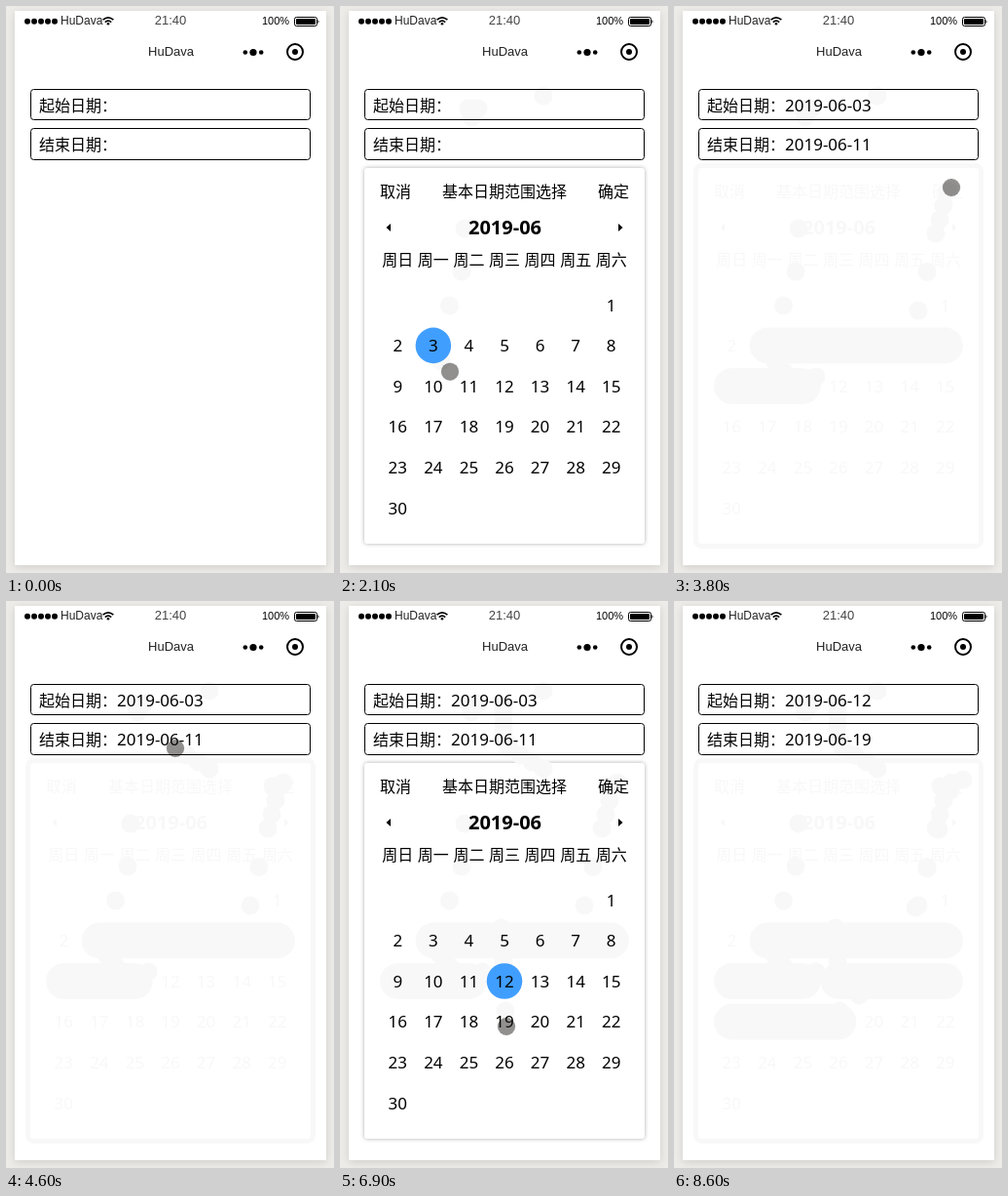
Write an HTML page that moves like this. It is 337 by 581 pixels and loops after 9.3 s.

```html
<!DOCTYPE html>
<html lang="zh-CN">
<head>
<meta charset="utf-8">
<title>日期范围选择</title>
<style>
html, body { margin: 0; width: 100%; height: 100%; overflow: hidden; background: #edece8; }
svg { display: block; width: 337px; height: 581px; }
text { font: 16px "Noto Sans CJK SC", "Noto Sans CJK", sans-serif; white-space: pre; }
.num { font: 17px "Noto Sans", sans-serif; }
.month { font: bold 20px "Noto Sans", sans-serif; }
.ui { font: 12px "Liberation Sans", sans-serif; }
.mid { text-anchor: middle; }
.phone { fill: #fff; filter: drop-shadow(0 2px 4px rgba(0, 0, 0, .13)); }
.field { fill: none; stroke: #000; }
.box { fill: #fff; filter: drop-shadow(0 0 2px rgba(0, 0, 0, .32)); }
.rim { fill: none; stroke: #f8f8f8; stroke-width: 5; }
.soft, .faint text, .faint path { fill: #f8f8f8; }
.band { fill: #a0cfff; }
.pick { fill: #409eff; }
#dot { fill: rgba(25, 22, 20, .48); stroke: rgba(0, 0, 0, .07); }
</style>
</head>
<body>
<svg viewBox="0 0 337 581">
  <rect class="phone" x="9" y="5" width="320" height="568"/>
  <g id="signal"></g>
  <text class="ui" x="56" y="19" fill="#222">HuDava</text>
  <g fill="none" stroke="#000" stroke-width="1.7">
    <path d="M99.6 14.2Q105 9.6 110.4 14.2M101.8 16.6Q105 13.8 108.2 16.6"/>
    <circle cx="105" cy="18.3" r="1.3" fill="#000" stroke="none"/>
  </g>
  <text class="ui mid" x="169" y="19" fill="#444" style="font-size:13px">21:40</text>
  <text class="ui" x="263" y="19" style="font-size:11px">100%</text>
  <rect x="296.5" y="11.5" width="23" height="9" rx="2" fill="none" stroke="#000"/>
  <rect x="298" y="13" width="20" height="6" rx="1"/>
  <path d="M320.5 14q2 2 0 4z"/>
  <text class="ui mid" x="169.5" y="51" fill="#222" style="font-size:13px">HuDava</text>
  <circle cx="245.8" cy="47.5" r="2.3"/><circle cx="254" cy="47.5" r="3.6"/><circle cx="262.2" cy="47.5" r="2.3"/>
  <circle cx="297" cy="47" r="8" fill="none" stroke="#000" stroke-width="2"/><circle cx="297" cy="47" r="3"/>

  <rect id="rim" class="rim" x="22.5" y="163.5" width="293" height="390" rx="6"/>
  <rect id="box" class="box" x="25" y="166" width="288" height="385" rx="3"/>
  <g id="trail"></g>
  <g id="bands"></g>
  <g id="sheet">
    <text x="41" y="196">取消</text>
    <text x="105" y="196">基本日期范围选择</text>
    <text x="265" y="196">确定</text>
    <path d="M52 223v8l-4.5-4zM286 223v8l4.5-4z"/>
    <text class="month mid" x="169.5" y="234">2019-06</text>
  </g>

  <rect class="field" x="25.5" y="85.5" width="287" height="31" rx="3"/>
  <rect class="field" x="25.5" y="125.5" width="287" height="32" rx="3"/>
  <text x="34" y="108">起始日期：</text><text id="from" class="num" x="114" y="108"></text>
  <text x="34" y="148">结束日期：</text><text id="to" class="num" x="114" y="148"></text>
  <rect id="caret" y="91" width="1" height="21"/>
  <path id="hand" fill="#fff" stroke="#222" d="M302 66V57q2-2 3 0v5l7 2q2 1 1 5l-2 6h-7l-6-7q0-3 4-2z"/>
  <circle id="dot" r="9"/>
</svg>
<script>
const LOOP = 9300, COL = 256 / 7, ROW = 41.6;
const $ = id => document.getElementById(id);
const show = (el, on) => { el.style.display = on ? '' : 'none'; };

function add(parent, tag, attrs, text) {
  const el = document.createElementNS('http://www.w3.org/2000/svg', tag);
  for (const k in attrs) el.setAttribute(k, attrs[k]);
  if (text) el.textContent = text;
  return parent.appendChild(el);
}

const colX = c => 41 + COL * (c + .5);
const rowY = r => 306.3 + ROW * r;
// June 2019 begins on a Saturday
const cell = day => ({ c: (day + 5) % 7, r: Math.floor((day + 5) / 7) });

for (let i = 0; i < 5; i++) add($('signal'), 'circle', { cx: 22 + 7 * i, cy: 15.8, r: 3 });
[...'日一二三四五六'].forEach((d, i) =>
  add($('sheet'), 'text', { class: 'mid', x: colX(i), y: 266 }, '周' + d));
for (let d = 1; d <= 30; d++) {
  const { c, r } = cell(d);
  add($('sheet'), 'text', { class: 'num mid', x: colX(c), y: rowY(r) + 6.2 }, String(d));
}

function pill(g, cls, a, b, r) {
  add(g, 'rect', { class: cls, x: 41 + a * COL, y: rowY(r) - COL / 2, width: (b - a + 1) * COL, height: COL, rx: COL / 2 });
}
function range(cls, from, to) {
  const g = add($('bands'), 'g', {}), a = cell(from), b = cell(to);
  for (let r = a.r; r <= b.r; r++) pill(g, cls, r === a.r ? a.c : 0, r === b.r ? b.c : 6, r);
  return g;
}
function pick(day) {
  const g = add($('bands'), 'g', {}), { c, r } = cell(day);
  pill(g, 'pick', c, c, r);
  return g;
}

// one row per gesture: time (in 100 ms), x, y
const gestures = [
  [[3, 209, 92], [4, 142, 105], [6, 132, 105]],
  [[12, 135, 114], [13, 128, 228], [14, 125, 272], [16, 100, 342], [17, 97, 352]],
  [[20, 104, 364], [23, 131, 396]],
  [[27, 146, 380], [28, 251, 312], [30, 269, 233], [33, 281, 190]],
  [[36, 285, 186]],
  [[41, 282, 190], [42, 274, 190], [43, 209, 172], [46, 174, 151], [50, 168, 138]],
  [[51, 168, 134], [53, 168, 116], [56, 168, 107]],
  [[62, 166, 335], [63, 168, 370], [65, 169, 390]],
  [[68, 170, 420], [69, 171, 436]],
  [[73, 190, 404], [74, 248, 314], [77, 284, 194]],
  [[84, 297, 183], [85, 313, 143]]
];

// the pointer moves in 100 ms steps
const path = [];
for (const keys of gestures) {
  keys.forEach(([t, x, y], i) => {
    const [t2, x2, y2] = keys[i + 1] || [t + 1, x, y];
    for (let s = t; s < t2; s++) {
      const k = (s - t) / (t2 - t);
      path.push({ t: s * 100, x: x + (x2 - x) * k, y: y + (y2 - y) * k });
    }
  });
}
const prints = path.map(p => add($('trail'), 'circle', { class: 'soft', cx: p.x, cy: p.y, r: 9.5 }));

// element, then pairs of on and off times
const spans = [
  [range('soft', 3, 11), 2600, LOOP],
  [range('soft', 12, 19), 7200, LOOP],
  [range('band', 3, 11), 2600, 3800, 5900, 6700],
  [range('band', 12, 19), 7200, 8100],
  [pick(3), 1900, 3800, 5900, 6700],
  [pick(11), 2600, 3800, 5900, 6700],
  [pick(12), 6700, 8100],
  [pick(19), 7200, 8100],
  [$('box'), 900, 3800, 5900, 8100],
  [$('rim'), 3800, 5900, 8100, LOOP],
  [$('sheet'), 900, LOOP],
  [$('caret'), 800, 1300, 5800, 6300],
  [$('hand'), 200, 300],
  [$('dot'), 300, 8600]
];

function draw(t) {
  for (const [el, ...s] of spans) {
    show(el, s.some((on, i) => i % 2 === 0 && t >= on && t < s[i + 1]));
  }
  const open = (t >= 900 && t < 3800) || (t >= 5900 && t < 8100);
  $('sheet').setAttribute('class', open ? '' : 'faint');
  $('caret').setAttribute('x', t < 3800 ? 114 : 203);

  const days = t < 3800 ? null : t < 8100 ? ['03', '11'] : ['12', '19'];
  $('from').textContent = days ? '2019-06-' + days[0] : '';
  $('to').textContent = days ? '2019-06-' + days[1] : '';

  const step = path.filter(p => p.t <= t).length - 1;
  prints.forEach((el, i) => show(el, i < step));
  if (step >= 0) {
    $('dot').setAttribute('cx', path[step].x);
    $('dot').setAttribute('cy', path[step].y);
  }
}

const start = performance.now();
function tick() {
  draw((performance.now() - start) % LOOP);
  requestAnimationFrame(tick);
}
tick();
</script>
</body>
</html>
```
